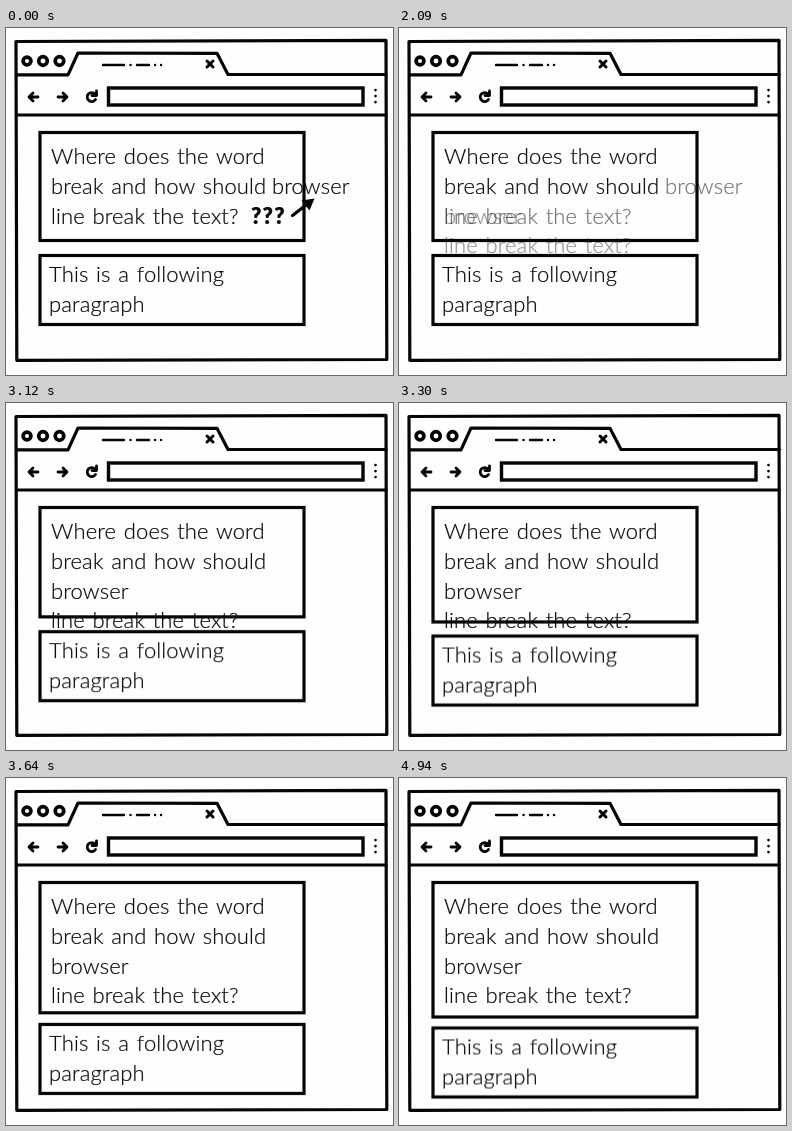
Recreate the animation shown at these times as an HTML page. Size 387 by 347 pixels, loop 5560 ms.

```html
<!DOCTYPE html>
<html lang="en">
<head>
<meta charset="utf-8">
<title>Where does the word break?</title>
<style>
  html, body { margin: 0; width: 100%; height: 100%; overflow: hidden; background: #fefdff; }
  svg { display: block; width: 100%; height: 100%; }
  text {
    font: 300 22px Lato, "Open Sans", sans-serif;
    letter-spacing: .12px; word-spacing: 1.6px;
    fill: #0a0a0a; stroke: #0a0a0a; stroke-width: .2px;
  }
  .ink { fill: none; stroke: #050505; stroke-width: 3.2; stroke-linecap: round; stroke-linejoin: round; }
  .box { stroke-linejoin: miter; }
  .solid { fill: #050505; stroke: none; }
  .marks text { font-weight: 900; letter-spacing: 1.2px; }

  .before, .after, .marks, .grow, .push { animation: 5560ms linear infinite both; }
  .before { animation-name: fade-out; }
  .after { animation-name: fade-in; }
  .marks { animation-name: vanish; }
  .grow { animation-name: grow; }
  .push { animation-name: push; }

  /* Text reflows from 1940 to 2450 ms */
  @keyframes fade-out {
    0% { opacity: 1; }
    34.89% { opacity: 1; animation-timing-function: ease-out; }
    44.06%, 100% { opacity: 0; }
  }
  @keyframes fade-in {
    0% { opacity: 0; }
    34.89% { opacity: 0; animation-timing-function: ease-out; }
    44.06%, 100% { opacity: 1; }
  }
  @keyframes vanish {
    0%, 34.89% { opacity: 1; }
    37.2%, 100% { opacity: 0; }
  }
  /* Boxes make room from 2940 to 3940 ms */
  @keyframes grow {
    0% { height: 108px; }
    52.88% { height: 108px; animation-timing-function: cubic-bezier(.5, 0, .5, 1); }
    70.86%, 100% { height: 134.5px; }
  }
  @keyframes push {
    0% { transform: translateY(0); }
    52.88% { transform: translateY(0); animation-timing-function: cubic-bezier(.5, 0, .5, 1); }
    70.86%, 100% { transform: translateY(22.5px); }
  }
</style>
</head>
<body>
<svg viewBox="0 0 387 347">
  <!-- Browser window -->
  <g class="ink">
    <path d="M10 13.5 L380 12.3 L380.8 331.5 L10.8 332.3 Z"/>
    <path d="M11 46.8 H62 L72 25 L211 25.3 L222 46.5 H380 M11 87 H380"/>
    <g stroke-width="3.7">
      <circle cx="21" cy="33" r="3.9"/>
      <circle cx="37" cy="33" r="4.3"/>
      <circle cx="53.5" cy="33" r="4.3"/>
    </g>
    <path style="stroke-width:2.4" d="M97 37 H118 M124.5 37 h.1 M131 37 H143 M149 37 h.1 M155 37 h.1"/>
    <path style="stroke-width:3" d="M201 33 l6 6 M207 33 l-6 6"/>
    <path style="stroke-width:2.8" d="M32 69 H23 m4 -4 l-4 4 l4 4 M52 69 H61 m-4 -4 l4 4 l-4 4"/>
    <path style="stroke-width:2.8" d="M89 66 A4.5 4.5 0 1 0 89.5 71.5 M90.5 63 V67.5 H86"/>
    <rect class="box" x="102.5" y="60" width="254.5" height="17" style="stroke-width:3.4"/>
    <path style="stroke-width:2.7" d="M369.5 62 v.1 M369.5 68 v.1 M369.5 74 v.1"/>
  </g>

  <!-- First paragraph -->
  <rect class="ink box grow" x="34" y="104.5" width="264" height="108"/>
  <text x="45" y="136">Where does the word</text>
  <text x="45" y="166">break and how should</text>
  <g class="before">
    <text x="266" y="166">browser</text>
    <text x="45" y="195.5">line break the text?</text>
  </g>
  <g class="after">
    <text x="45" y="195.5">browser</text>
    <text x="45" y="225">line break the text?</text>
  </g>
  <g class="marks">
    <text x="245" y="195.5">???</text>
    <path class="ink" d="M286.5 187.5 L300 177"/>
    <path class="solid" d="M308.5 170.5 L295.5 172.5 L303.5 182.5 Z"/>
  </g>

  <!-- Second paragraph -->
  <g class="push">
    <rect class="ink box" x="34" y="227.5" width="264" height="69"/>
    <text x="43" y="254">This is a following</text>
    <text x="43" y="284">paragraph</text>
  </g>
</svg>
</body>
</html>
```
